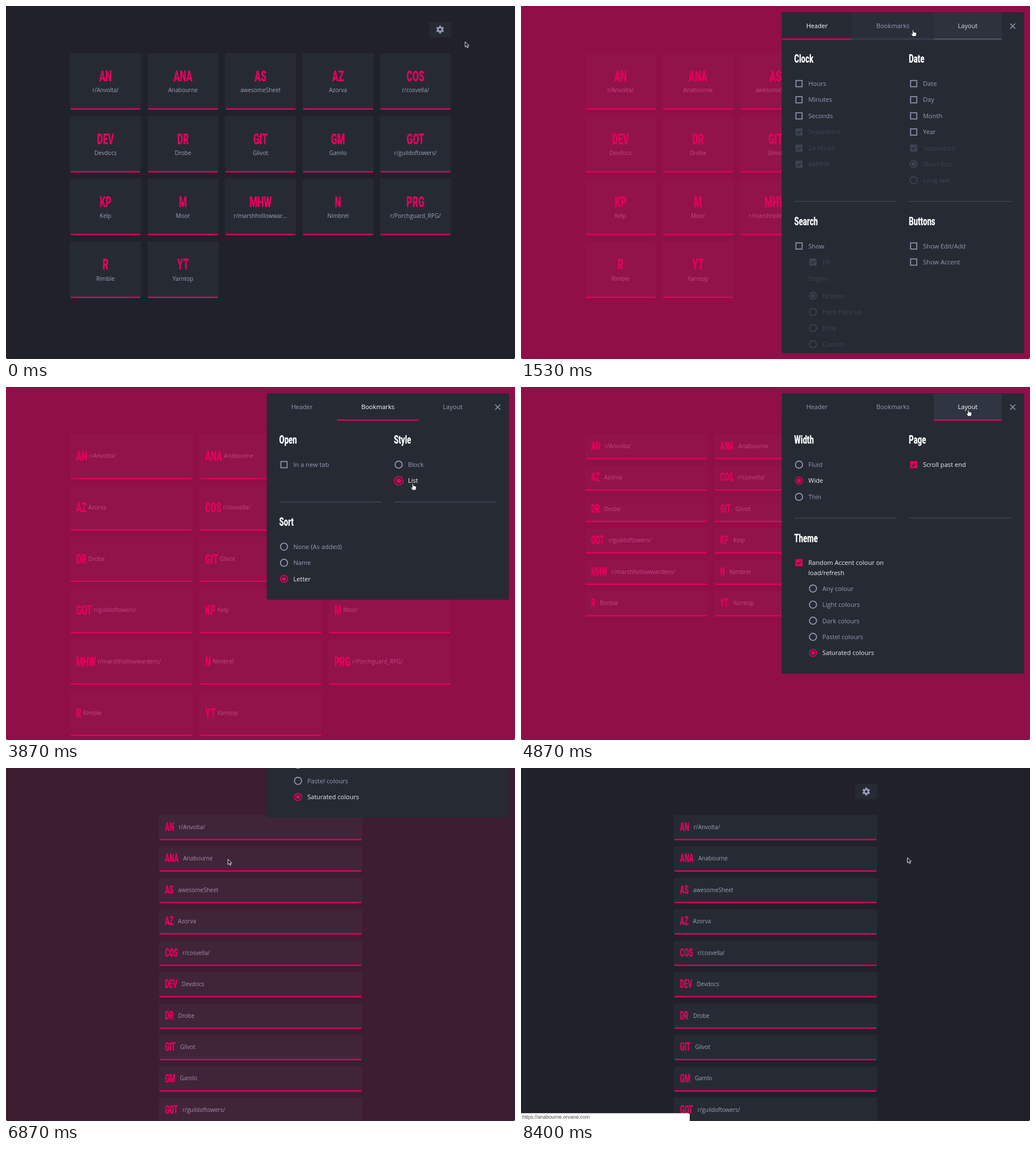
Recreate the animation shown at these times as an HTML page. Size 899 by 623 pixels, loop 8.47 s.

```html
<!DOCTYPE html>
<html lang="en">
<head>
<meta charset="utf-8">
<title>Bookmark page settings</title>
<style>
html, body { margin: 0; width: 100%; height: 100%; overflow: hidden; background: #21212b; }
svg { display: block; width: 899px; height: 623px; }
text { font-family: "Open Sans", "Noto Sans", sans-serif; white-space: pre; }
.letter, .head { font-family: Roboto, "Liberation Sans", sans-serif; font-weight: 900; }
.letter { fill: #e6005c; stroke: #e6005c; stroke-width: .2; }
.head { font-size: 19.5px; fill: #fff; }
.name { font-size: 10px; fill: #9aa1bc; }
.label { font-size: 11.1px; }
.status { font: 9px "Liberation Sans", Arial, sans-serif; fill: #4a4a4a; }
</style>
</head>
<body>
<svg viewBox="0 0 899 623"></svg>
<script>
const LOOP = 8470;
const PINK = '#e6005c', CARD = '#262b33', HOVER = '#303542';
const GREY = '#949bb6', LIGHT = '#eceef6', OFF = '#3e4452', RULE = '#3a3e4c';
const OPEN = 670, TAB2 = 1930, LIST = 3843, TAB3 = 4500, THIN = 5900, CLOSE = 6680;
const TOP = 83, GAP = 11.4, ROW_GAP = 10.9, NARROW = 0.6;

const svg = document.querySelector('svg');
const set = (node, attrs) => {
  for (const key in attrs) node.setAttribute(key, attrs[key]);
  return node;
};
function add(parent, tag, attrs, text) {
  const node = set(document.createElementNS(svg.namespaceURI, tag), attrs || {});
  if (text) node.textContent = text;
  parent.appendChild(node);
  return node;
}
const show = (node, on) => set(node, { display: on ? 'inline' : 'none' });
const clamp = v => Math.max(0, Math.min(1, v));
const span = (t, from, length) => clamp((t - from) / length);
const lerp = (a, b, p) => a + (b - a) * p;
const easeOut = p => 1 - (1 - p) ** 3;
const smooth = p => p * p * (3 - 2 * p);
function mix(a, b, p) {
  const part = (c, i) => parseInt(c.substr(1 + 2 * i, 2), 16);
  return `rgb(${[0, 1, 2].map(i => Math.round(lerp(part(a, i), part(b, i), p)))})`;
}

// Pointer
const path = [
  [70, 811, 63], [600, 771, 44], [1270, 771, 44], [1730, 640, 41], [2250, 640, 41],
  [2670, 570, 225], [3000, 525, 335], [3200, 525, 335], [3730, 718.5, 170.5], [3950, 718.5, 170.5],
  [4400, 790, 40], [5270, 790, 40], [5800, 520.5, 190], [6200, 520.5, 190], [6660, 392, 161],
  [7870, 392, 161], [8400, 682.5, 158]
];
function pointer(t) {
  const i = path.findIndex(k => k[0] > t);
  if (i === 0) return path[0].slice(1);
  if (i < 0) return path[path.length - 1].slice(1);
  const [t0, x0, y0] = path[i - 1], [t1, x1, y1] = path[i];
  const p = smooth((t - t0) / (t1 - t0));
  return [lerp(x0, x1, p), lerp(y0, y1, p)];
}
function inside(t, x, y, w, h) {
  const [px, py] = pointer(t);
  return px >= x && px < x + w && py >= y && py < y + h;
}
// Share of the last `fade` ms spent over a box, seen from time `since`
function hover(t, since, box, fade = 150) {
  let sum = 0;
  for (let i = 0; i < 15; i++) {
    const s = t - i * fade / 15;
    if (s >= since && inside(s, ...box)) sum++;
  }
  return sum / 15;
}

// Bookmarks
const marks = [
  ['AN', 'r/Anvolta/'], ['ANA', 'Anabourne'], ['AS', 'awesomeSheet'], ['AZ', 'Azorva'],
  ['COS', 'r/cosvella/'], ['DEV', 'Devdocs'], ['DR', 'Drobe'], ['GIT', 'Glivot'],
  ['GM', 'Gamlo'], ['GOT', 'r/guildoftowers/'], ['KP', 'Kelp'], ['M', 'Moor'],
  ['MHW', 'r/marshhollowwardens/', 'r/marshhollowwar...'], ['N', 'Nimbrel'],
  ['PRG', 'r/Porchguard_RPG/'], ['R', 'Rimble'], ['YT', 'Yarntop']
];
add(svg, 'rect', { width: 899, height: 623, fill: '#21212b' });
const pen = document.createElement('canvas').getContext('2d');
pen.font = '900 100px Roboto, "Liberation Sans", sans-serif';
const cards = marks.map(([letter, name, short]) => {
  const g = add(svg, 'g');
  return {
    name, short: short || name,
    em: pen.measureText(letter).width / 100 * NARROW,
    box: add(g, 'rect', { rx: 2, fill: CARD }),
    line: add(g, 'rect', { rx: 1.1, height: 2.3, fill: PINK }),
    letter: add(g, 'text', { class: 'letter' }, letter),
    label: add(g, 'text', { class: 'name' }, name)
  };
});

const gear = add(svg, 'g');
const gearBox = add(gear, 'rect', { x: -19.5, y: -13.5, width: 39, height: 27, rx: 2, fill: CARD });
add(gear, 'circle', { r: 3.8, fill: 'none', stroke: GREY, 'stroke-width': 3.1 });
for (let i = 0; i < 6; i++) {
  add(gear, 'rect', { x: -1.6, y: -6.9, width: 3.2, height: 3, rx: .5, fill: GREY, transform: `rotate(${i * 60})` });
}

const tint = add(svg, 'rect', { width: 899, height: 623, fill: PINK });

// Settings panel
const panel = add(svg, 'g');
const sheet = add(panel, 'rect', { x: 460.6, y: 11.2, width: 427.6, rx: 2, fill: CARD, stroke: '#000', 'stroke-opacity': .08 });
const tabs = [['Header', 461, 123.5], ['Bookmarks', 584.5, 144.5], ['Layout', 729, 120]].map(([name, x, w]) => ({
  x, w,
  box: add(panel, 'rect', { x, y: 12, width: w, height: 47.5 }),
  line: add(panel, 'rect', { x, y: 57.3, width: w, height: 2.2 }),
  label: add(panel, 'text', { x: x + w / 2, y: 39.2, class: 'label', 'text-anchor': 'middle' }, name)
}));
add(panel, 'path', { d: 'M864 31l9 9m0-9l-9 9', stroke: GREY, 'stroke-width': 1.5 });
const pages = [601, 364, 494.5].map(height => ({ height, g: add(panel, 'g') }));
const options = [];

function heading(page, x, y, text) {
  add(pages[page].g, 'text', { class: 'head', transform: `translate(${x} ${y + 7}) scale(.68 1)` }, text);
}
function rules(page, y) {
  for (const x of [482.5, 685]) {
    add(pages[page].g, 'rect', { x, y: y - 1, width: 181, height: 2, fill: RULE });
  }
}
// state: '' empty, 'on', 'off' disabled, 'off on', or a function of time
function option(page, kind, x, y, text, state = '') {
  const g = pages[page].g, round = kind === 'radio';
  const mark = add(g, round ? 'circle' : 'rect', round
    ? { cx: x, cy: y, r: 6.3, fill: 'none', 'stroke-width': 1.7 }
    : { x: x - 5.5, y: y - 5.5, width: 11, height: 11, 'stroke-width': 1.6 });
  const core = round
    ? add(g, 'circle', { cx: x, cy: y, r: 3.4 })
    : add(g, 'path', { d: `M${x - 3.4} ${y}l2.4 2.5 4.5-4.8`, fill: 'none', stroke: CARD, 'stroke-width': 1.7 });
  const label = add(g, 'text', { x: x + 16.5, y: y + 4, class: 'label' }, text);
  options.push({ page, round, x, y, mark, core, label, state });
}
function column(page, kind, x, y, rows) {
  rows.forEach(([text, state], i) => option(page, kind, x, y + i * 28.45, text, state));
}

heading(0, 482.5, 93, 'Clock');
column(0, 'check', 491, 137, [['Hours'], ['Minutes'], ['Seconds'],
  ['Separators', 'off on'], ['24 Hours', 'off on'], ['AM/PM', 'off on']]);
heading(0, 685, 93, 'Date');
column(0, 'check', 693.5, 137, [['Date'], ['Day'], ['Month'], ['Year'], ['Separators', 'off on']]);
column(0, 'radio', 693.5, 279.2, [['Short text', 'off on'], ['Long text', 'off']]);
rules(0, 345);
heading(0, 482.5, 380, 'Search');
option(0, 'check', 491, 423.5, 'Show');
option(0, 'check', 515.7, 452, 'Fill', 'off on');
add(pages[0].g, 'text', { x: 507.5, y: 484.5, class: 'label', fill: OFF }, 'Engine');
column(0, 'radio', 515.7, 511.5, [['Orvane', 'off on'], ['Hare Hare Up', 'off'], ['Jolpy', 'off'], ['Custom', 'off']]);
heading(0, 685, 380, 'Buttons');
column(0, 'check', 693.5, 423.5, [['Show Edit/Add'], ['Show Accent']]);

heading(1, 482.5, 93, 'Open');
option(1, 'check', 491, 137, 'In a new tab');
heading(1, 685, 93, 'Style');
column(1, 'radio', 693.5, 137, [['Block', t => t < LIST ? 'on' : ''], ['List', t => t < LIST ? '' : 'on']]);
rules(1, 203);
heading(1, 482.5, 238, 'Sort');
column(1, 'radio', 491, 281.8, [['None (As added)'], ['Name'], ['Letter', 'on']]);

heading(2, 482.5, 93, 'Width');
column(2, 'radio', 491, 137, [['Fluid'], ['Wide', t => t < THIN ? 'on' : ''], ['Thin', t => t < THIN ? '' : 'on']]);
heading(2, 685, 93, 'Page');
option(2, 'check', 693.5, 137, 'Scroll past end', 'on');
rules(2, 231.5);
heading(2, 482.5, 266.5, 'Theme');
option(2, 'check', 491, 310, 'Random Accent colour on', 'on');
add(pages[2].g, 'text', { x: 507.5, y: 331.5, class: 'label', fill: LIGHT }, 'load/refresh');
column(2, 'radio', 515.7, 355.6, [['Any colour'], ['Light colours'], ['Dark colours'], ['Pastel colours'], ['Saturated colours', 'on']]);

const status = add(svg, 'g');
add(status, 'path', { d: 'M0 609.3H295q3 0 3 3V623H0z', fill: '#fff' });
add(status, 'text', { x: 2, y: 619.3, class: 'status' }, 'https://anabourne.orvane.com');

// Rounded lower window corners
add(svg, 'path', { d: 'M0 620v3h3q-3 0-3-3zM899 620v3h-3q3 0 3-3z', fill: '#fff' });

const arrow = add(svg, 'path', { d: 'M0 0V9.3L2.2 7.4 3.7 10.8 5.3 10.1 3.9 6.9H6.8z', fill: '#111', stroke: '#fff', 'stroke-width': .9 });
const hand = add(svg, 'path', {
  d: 'M-1 .8Q0-.6 1 .8V4Q2.2 3.4 2.8 4.3 4 3.9 4.5 4.8 6 4.6 6 6V8.2L5 11.4H-.6L-3.3 7.3Q-3.4 5.8-1 7.2z',
  fill: '#fff', stroke: '#16161c', 'stroke-width': .8
});

function drawCards(t) {
  const list = t >= LIST, cols = !list ? 5 : t < THIN ? 3 : 1;
  const p = easeOut(span(t, LIST, 200));
  const width = lerp(673, 359, easeOut(span(t, THIN, 250)));
  const left = 449.5 - width / 2;
  const w = (width - GAP * (cols - 1)) / cols, h = lerp(99.9, 44.55, p);
  const size = lerp(26.7, 19.5, p);
  cards.forEach((card, i) => {
    const x = left + (i % cols) * (w + GAP), y = TOP + Math.floor(i / cols) * (h + ROW_GAP);
    const glow = t > 6900 ? hover(t, 6930, [x, y, w, h]) : 0;
    const mid = y + (h - 2.3) / 2;
    const lx = list ? x + 10.7 : x + w / 2 - card.em * size / 2;
    const ly = (list ? mid + size * .355 : y + 50) - glow;
    set(card.box, { x, y, width: w, height: h, fill: mix(CARD, HOVER, glow) });
    set(card.line, { x: x + 1, y: y + h - 2.3, width: w - 2 });
    set(card.letter, { 'font-size': size, transform: `translate(${lx} ${ly}) scale(${NARROW} 1)` });
    set(card.label, {
      x: list ? lx + card.em * size + 8 * p : x + w / 2,
      y: list ? mid + 3.7 : y + 69.3,
      'text-anchor': list ? 'start' : 'middle'
    });
    card.label.textContent = list ? card.name : card.short;
  });
  set(gear, { transform: `translate(${left + width - 19.3} 41.5)` });
  set(gearBox, { fill: mix(CARD, HOVER, t < OPEN + 200 ? hover(t, 0, [748, 28, 39, 27]) : 0) });
}

function drawOption(o, t, page) {
  const state = typeof o.state === 'function' ? o.state(t) : o.state;
  const on = state.includes('on'), off = state.includes('off') ;
  const width = o.label.getComputedTextLength() + 25;
  const glow = !off && o.page === page ? hover(t, 2000, [o.x - 8, o.y - 11, width, 25]) : 0;
  const colour = off ? OFF : on ? PINK : mix(GREY, LIGHT, glow);
  set(o.mark, { stroke: colour });
  if (o.round) {
    set(o.mark, { r: 6.3 + (on ? 1.3 * glow : 0) });
    set(o.core, { fill: colour, r: 3.4 + (on ? .8 * glow : 0) });
  } else {
    set(o.mark, { fill: on ? colour : 'none' });
  }
  show(o.core, on);
  set(o.label, { fill: off ? OFF : mix(on ? LIGHT : GREY, '#ffffff', glow) });
}

function drawPanel(t) {
  const page = t < TAB2 ? 0 : t < TAB3 ? 1 : 2;
  const up = t < CLOSE ? (1 - span(t, OPEN, 250)) ** 1.7 : span(t, CLOSE, 250) ** 1.48;
  const veil = t < CLOSE ? span(t, OPEN, 250) : 1 - span(t, CLOSE, 250);
  set(tint, { opacity: .558 * veil });
  show(panel, up < 1);
  if (up >= 1) return;
  set(panel, { transform: `translate(0 ${-623 * up})` });
  set(sheet, { height: pages[page].height });
  pages.forEach((p, i) => show(p.g, i === page));
  tabs.forEach((tab, i) => {
    const active = i === page, glow = t < CLOSE ? hover(t, 800, [tab.x, 12, tab.w, 48], 300) : 0;
    set(tab.box, { fill: mix(CARD, HOVER, glow) });
    set(tab.line, { fill: active ? PINK : mix(CARD, '#666c80', glow) });
    set(tab.label, { fill: active ? '#fff' : mix(GREY, '#ffffff', glow > .5 ? glow : 0) });
  });
  options.forEach(o => { if (o.page === page) drawOption(o, t, page); });
}

function drawPointer(t) {
  const [x, y] = pointer(t);
  const open = t > OPEN && t < CLOSE;
  const page = t < TAB2 ? 0 : t < TAB3 ? 1 : 2;
  const link = open
    ? inside(t, 461, 12, 388, 48) || options.some(o => o.page === page && inside(t, o.x - 8, o.y - 11, 90, 25))
    : t <= OPEN ? inside(t, 748, 28, 39, 27) : t > 6950 && inside(t, 270, TOP, 359, 540);
  show(hand, link);
  show(arrow, !link);
  set(link ? hand : arrow, { transform: `translate(${x} ${y})` });
}

function frame() {
  const t = performance.now() % LOOP;
  drawCards(t);
  drawPanel(t);
  show(status, t > 7100);
  drawPointer(t);
  requestAnimationFrame(frame);
}
frame();
</script>
</body>
</html>
```
